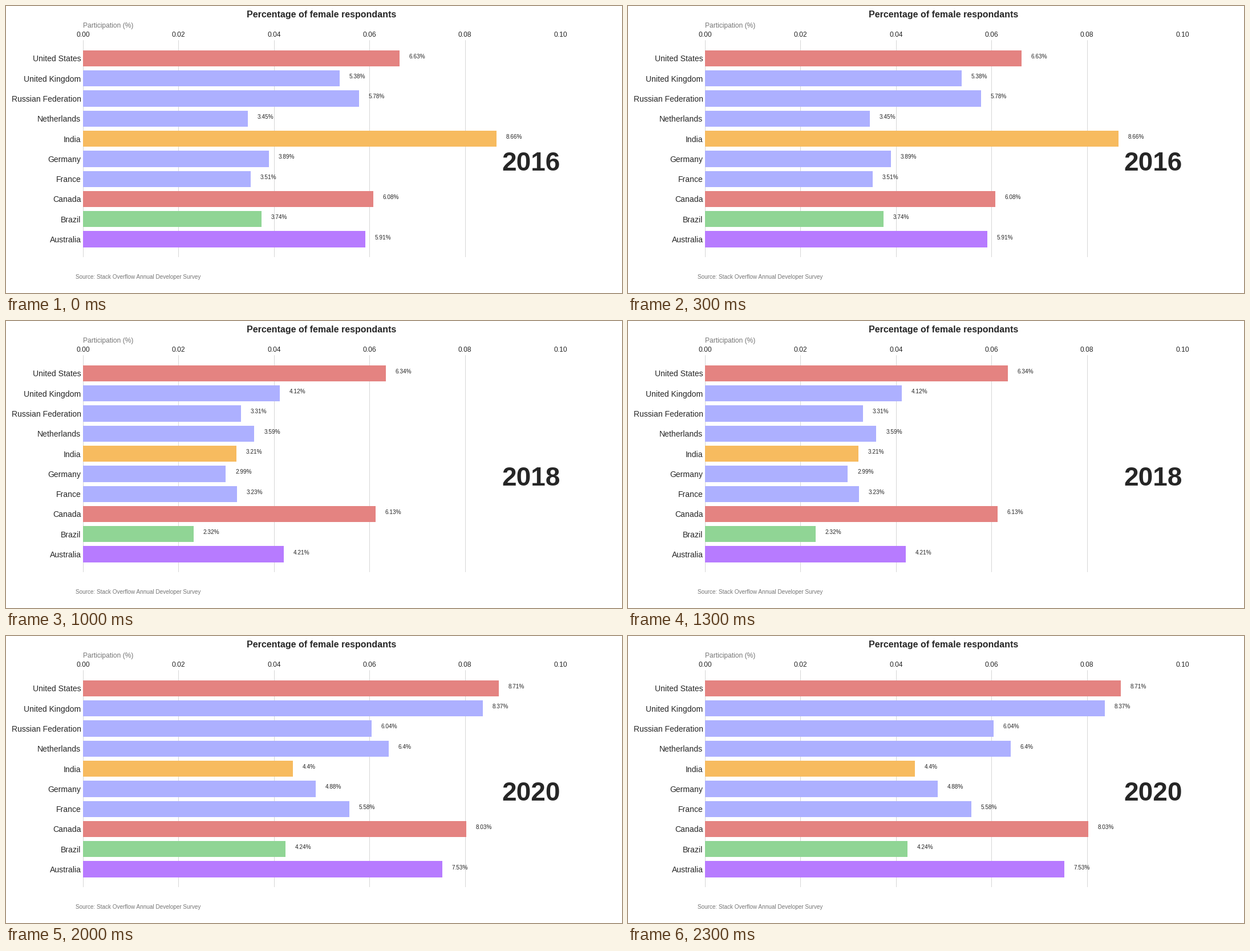
These frames come from a looping animation (1080 px wide and 504 px high, 2.5 s). A matplotlib script:

```python
import matplotlib.pyplot as plt
from matplotlib.animation import FuncAnimation

plt.rcParams.update({
    "font.family": "Liberation Sans",
    "text.color": "#262626",
    "xtick.color": "#262626",
    "ytick.color": "#262626",
})

RED, BLUE, ORANGE = "#e48381", "#adb0ff", "#f7bb5f"
GREEN, PURPLE, GREY = "#90d595", "#b77bff", "#777777"
FIRST_YEAR, YEARS = 2016, 5

# Country: (bar colour, percentage for each year), from bottom to top
DATA = {
    "Australia": (PURPLE, (5.91, 4.38, 4.21, 5.83, 7.53)),
    "Brazil": (GREEN, (3.74, 3.22, 2.32, 4.72, 4.24)),
    "Canada": (RED, (6.08, 6.72, 6.13, 9.16, 8.03)),
    "France": (BLUE, (3.51, 3.68, 3.23, 4.77, 5.58)),
    "Germany": (BLUE, (3.89, 3.69, 2.99, 5.05, 4.88)),
    "India": (ORANGE, (8.66, 4.43, 3.21, 6.29, 4.4)),
    "Netherlands": (BLUE, (3.45, 3.38, 3.59, 5.83, 6.4)),
    "Russian Federation": (BLUE, (5.78, 3.55, 3.31, 5.49, 6.04)),
    "United Kingdom": (BLUE, (5.38, 5.03, 4.12, 7.43, 8.37)),
    "United States": (RED, (6.63, 7.39, 6.34, 9.99, 8.71)),
}
colors, series = zip(*DATA.values())

fig = plt.figure(figsize=(15, 7), dpi=72, facecolor="white")
ax = fig.add_axes([0.125, 0.125, 0.775, 0.755])
ax.set_frame_on(False)
ax.set_axisbelow(True)
ax.grid(axis="x", color="#cccccc", linewidth=0.8)

bars = ax.barh(list(DATA), [0.1] * len(DATA), height=0.8, color=colors)
margin = 0.05 * (len(DATA) - 0.2)
ax.set_ylim(-0.4 - margin, len(DATA) - 0.6 + margin)
ax.xaxis.set_ticks_position("top")
ax.xaxis.set_major_locator(plt.MultipleLocator(0.02))
ax.xaxis.set_major_formatter("{x:.2f}")
ax.tick_params(axis="x", length=0, pad=3.5, labelsize=12)
ax.tick_params(axis="y", length=0, pad=3.5, labelsize=14)


def note(x, y, text, **style):
    return ax.text(x, y, text, transform=ax.transAxes, **style)


note(0.5, 1.1064, "Percentage of female respondants", size=16, weight="bold", ha="center")
note(0, 1.06, "Participation (%)", size=12, color=GREY)
note(-0.015, -0.1, "Source: Stack Overflow Annual Developer Survey", size=10, color=GREY)
year_text = note(1, 0.4, "", size=46, weight="bold", ha="right")
value_texts = [ax.text(0, row, "", size=10) for row in range(len(DATA))]


def draw(index):
    percents = [values[index] for values in series]
    for bar, label, percent in zip(bars, value_texts, percents):
        share = percent / 100
        bar.set_width(share)
        label.set_x(share + 0.002)
        label.set_text(f"{percent}%")
    ax.set_xlim(0, max(0.1, 1.05 * max(percents) / 100))
    year_text.set_text(str(FIRST_YEAR + index))
    return [*bars, *value_texts, year_text]


anim = FuncAnimation(fig, draw, frames=YEARS, interval=500, repeat=True, repeat_delay=0)
plt.show()
```
